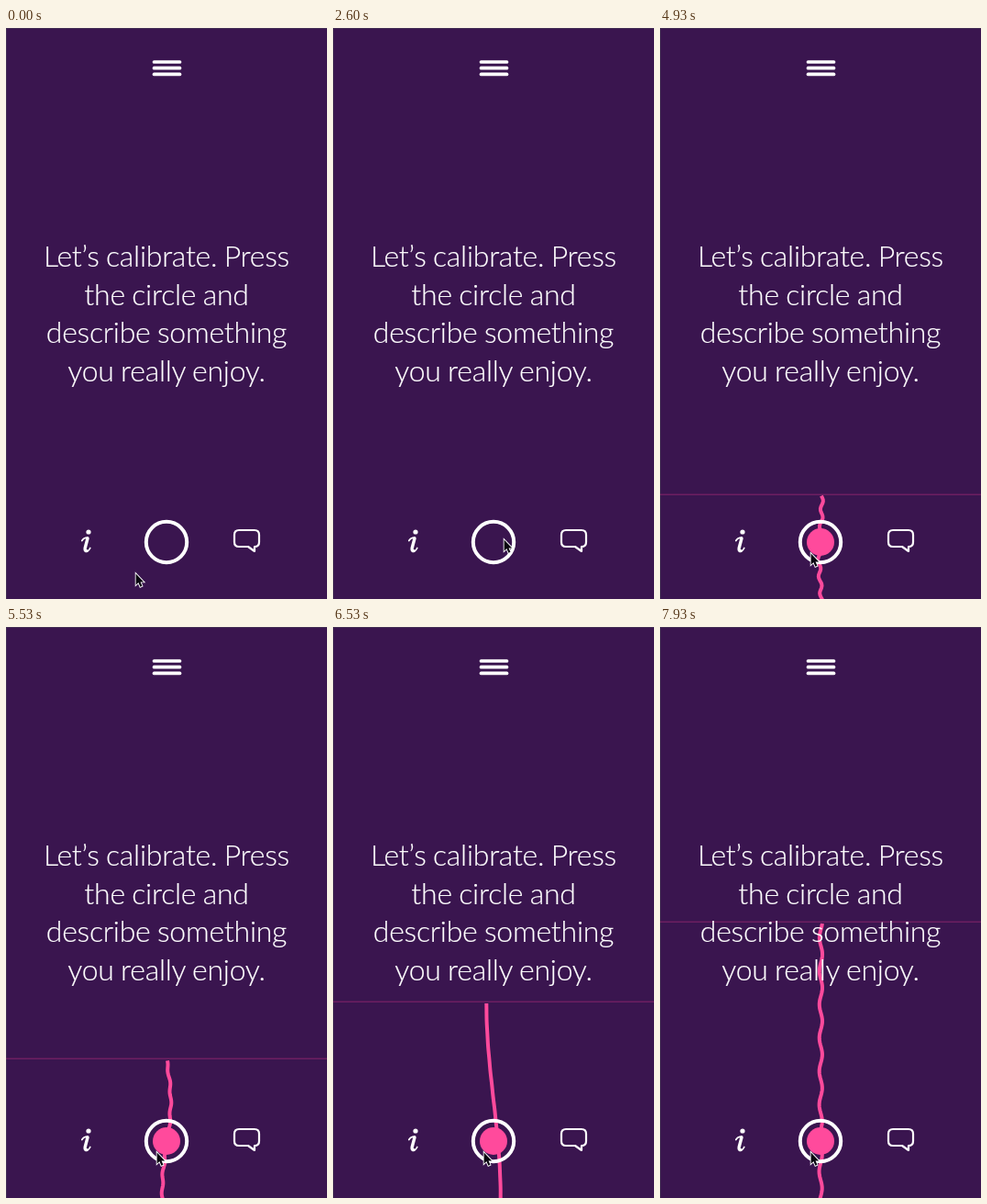
An HTML page with a canvas that plays this animation: 350x622 px, repeating every 8 s.

```html
<!DOCTYPE html>
<html lang="en">
<head>
<meta charset="utf-8">
<title>Calibrate</title>
<style>
  html, body { margin: 0; width: 100%; height: 100%; overflow: hidden; background: #3a154f; }
  canvas { position: absolute; left: 0; top: 0; }
  p {
    position: absolute; left: 0; top: 227px; width: 350px; margin: 0;
    font: 300 32px/1.3 Lato, sans-serif; color: #fff;
    letter-spacing: -0.25px; word-spacing: -1px;
    -webkit-text-stroke: 0.2px #fff;
    text-align: center; white-space: nowrap;
  }
</style>
</head>
<body>
<canvas id="stage" width="350" height="622"></canvas>
<p>Let’s calibrate. Press<br>the circle and<br>describe something<br>you really enjoy.</p>
<script>
const ctx = document.getElementById('stage').getContext('2d');
const W = 350, H = 622, CX = 175, CY = 560;
const FPS = 15, STEPS = 120, PRESS = 46;
const PINK = '#ff4a9c', WHITE = '#fff', RISE = 4.148;

// Pointer glides: first step, last step, dx, dy
const glides = [[0, 7, 9, -9], [9, 21, 36, -28], [39, 45, -22, 15]];

function ease(from, to, n) {
  const u = Math.min(1, Math.max(0, (n - from) / (to - from)));
  return u * u * (3 - 2 * u);
}

function disc(x, y, r, color) {
  ctx.fillStyle = color;
  ctx.beginPath();
  ctx.arc(x, y, r, 0, Math.PI * 2);
  ctx.fill();
}

function stroke(path, width, color = WHITE) {
  ctx.lineWidth = width;
  ctx.strokeStyle = color;
  ctx.stroke(new Path2D(path));
}

// A slow bend swells up and takes over from a ripple that gets longer
function waveX(y, v, n) {
  const swell = Math.exp(-(((n - 95) / 16) ** 2));
  const age = n - 83;
  const bend = 8 * swell * Math.sin(2 * Math.PI * v * (0.8 - 0.02 * age) - age * Math.PI / 30);
  const length = 12 + 0.4 * Math.max(0, n - 58);
  const ripple = 1.8 * (1 - swell) * Math.sin(2 * Math.PI * y / length + n * 2.4);
  return CX + bend + ripple;
}

function drawWave(n) {
  const head = H - (n - PRESS - 0.43) * RISE;
  ctx.fillStyle = 'rgba(255, 60, 150, 0.26)';
  ctx.fillRect(0, Math.round(head) - 0.5, W, 1.5);

  ctx.lineCap = 'butt';
  ctx.lineWidth = 4;
  ctx.strokeStyle = PINK;
  ctx.beginPath();
  for (let y = head + 2; y < H + 4; y += 2) {
    ctx.lineTo(waveX(y, (y - head) / (H - head), n), y);
  }
  ctx.stroke();
}

function drawIcons(pressed) {
  ctx.lineCap = ctx.lineJoin = 'round';
  for (let i = 0; i < 3; i++) stroke(`M161.5 ${37 + i * 6.7} H189.5`, 3.7);

  if (pressed) disc(CX, CY, 15, PINK);
  ctx.lineWidth = 4;
  ctx.beginPath();
  ctx.arc(CX, CY, 22.2, 0, Math.PI * 2);
  ctx.stroke();

  // info
  disc(90, 549, 2.6, WHITE);
  stroke('M89 556 L86.2 566.5 Q85.6 569.8 88 569.6', 3.4);
  stroke('M82.8 558.5 Q84.5 555.5 89 555.2 M87 570.3 Q90 570.3 91.8 566.5', 1.7);

  // speech bubble
  stroke('M254 547 H271 Q276 547 276 552 V560 Q276 565 271 565 V570 L264 565 H254 Q249 565 249 560 V552 Q249 547 254 547 Z', 2.2);
}

function drawPointer(n) {
  let x = 141.6, y = 594.4;
  for (const [from, to, dx, dy] of glides) {
    const u = ease(from, to, n);
    x += dx * u;
    y += dy * u;
  }
  ctx.save();
  ctx.translate(x, y);
  ctx.scale(0.86, 0.88);
  ctx.lineJoin = 'miter';
  const arrow = 'M0 0 V14 L3.2 11 L5.6 16.4 L8 15.3 L5.7 10.2 H10 Z';
  stroke(arrow, 2);
  ctx.fillStyle = '#0a0610';
  ctx.fill(new Path2D(arrow));
  ctx.restore();
}

function draw(n) {
  ctx.fillStyle = '#3a154f';
  ctx.fillRect(0, 0, W, H);
  ctx.fillStyle = '#402c52';
  ctx.fillRect(0, 0, W, 1);
  ctx.fillRect(0, 0, 1, H);
  if (n > PRESS) drawWave(n);
  drawIcons(n >= PRESS);
  drawPointer(n);
}

function tick() {
  draw(Math.floor((performance.now() + 4) * FPS / 1000) % STEPS);
  requestAnimationFrame(tick);
}
tick();
</script>
</body>
</html>
```
